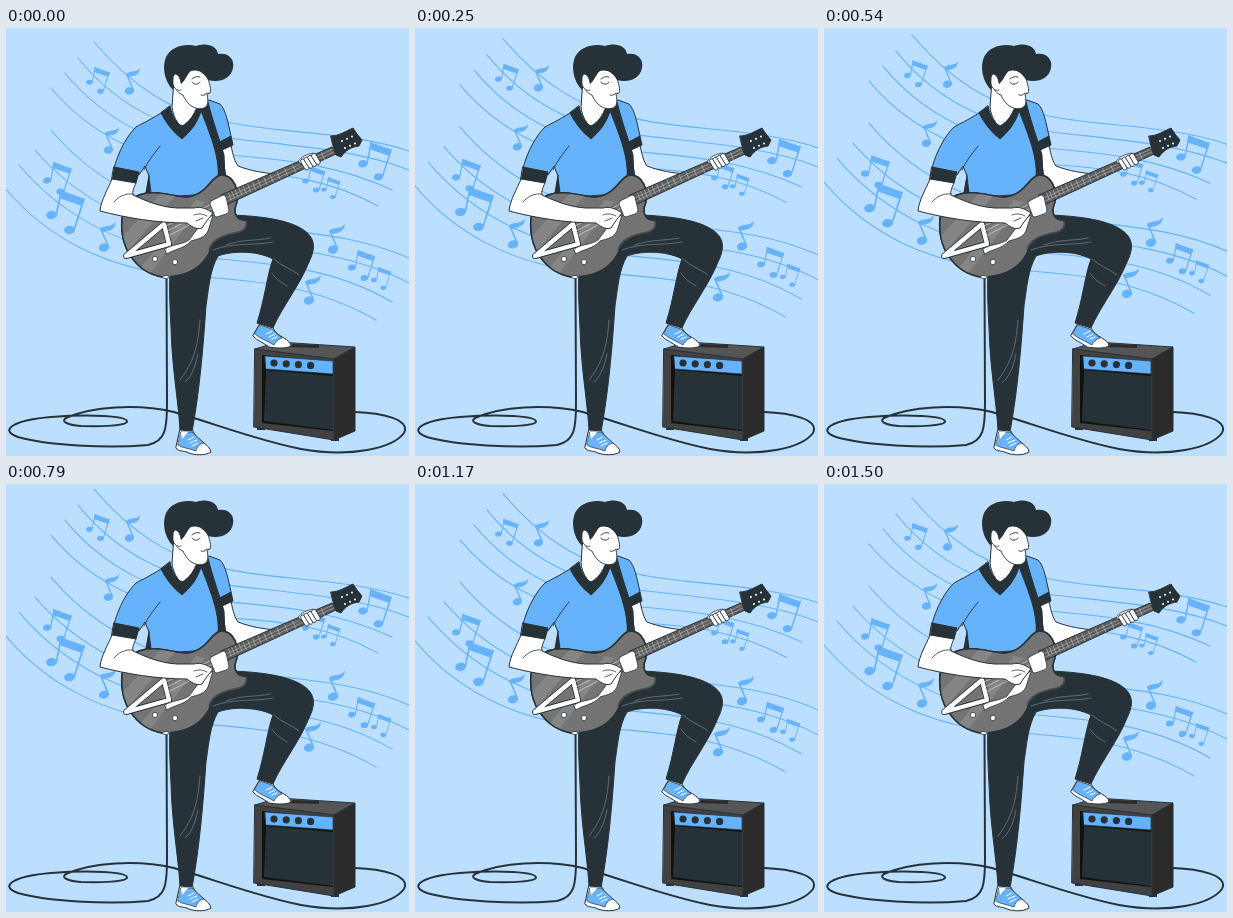
Animation, 403 px wide and 428 px high, one loop 1540 ms. Source, as an HTML page with a canvas:

```html
<!DOCTYPE html>
<html lang="en">
<head>
<meta charset="utf-8">
<title>Guitarist</title>
<style>
html, body { margin: 0; width: 100%; height: 100%; overflow: hidden; background: #bcdfff; }
canvas { display: block; width: 403px; height: 428px; }
</style>
</head>
<body>
<canvas></canvas>
<script>
const LOOP = 1540, FRAME_MS = 1000 / 24, HALF = 18, LIFT = 9.4;
const SKY = '#bcdfff', BLUE = '#66b3fc', INK = '#263238', WHITE = '#fff';
const W = 403, H = 428;
const dpr = window.devicePixelRatio || 1;
const canvas = document.querySelector('canvas');
canvas.width = W * dpr;
canvas.height = H * dpr;
const ctx = canvas.getContext('2d');

function fill(d, color) {
  ctx.fillStyle = color;
  ctx.fill(new Path2D(d));
}
function line(d, color = INK, width = 1) {
  ctx.strokeStyle = color;
  ctx.lineWidth = width;
  ctx.stroke(new Path2D(d));
}
function shape(d, color, edge = INK, width = 1) {
  fill(d, color);
  line(d, edge, width);
}
function oval(x, y, rx, ry, angle, color, edge) {
  ctx.beginPath();
  ctx.ellipse(x, y, rx, ry, angle, 0, Math.PI * 2);
  ctx.fillStyle = color;
  ctx.fill();
  if (edge) { ctx.strokeStyle = edge; ctx.lineWidth = 0.8; ctx.stroke(); }
}
function at(x, y, scale, draw) {
  ctx.save();
  ctx.translate(x, y);
  ctx.scale(scale, scale);
  draw();
  ctx.restore();
}

const staves = [
  'M88,14C124,56 165,86 222,94C265,105 345,103 403,123',
  'M72,30C110,77 162,104 222,110C285,118 350,121 403,142',
  'M59,45C98,93 155,121 222,127C285,132 335,138 386,162',
  'M45,60C85,108 145,137 222,143C280,146 325,152 372,178',
  'M45,102C85,150 145,183 215,194C285,205 345,204 403,230',
  'M29,122C70,170 130,202 205,212C275,220 345,224 403,255',
  'M13,137C55,187 115,220 190,229C260,235 325,238 386,274',
  'M0,161C40,209 98,239 168,247C238,252 305,254 370,292'
];
const pairs = [
  [80, 39, .61], [37, 134, .74], [40, 162, 1], [352, 114, .87],
  [342, 222, .7], [365, 239, .52], [315, 149, .5], [296, 138, .6]
];
const singles = [
  [118, 40, .9], [97, 99, .9], [92, 194, 1], [321, 196, 1], [297, 247, 1]
];

function drawPair() {
  oval(5.5, 25, 5.4, 4.2, -.1, BLUE);
  oval(23.5, 40, 5.4, 4.2, -.1, BLUE);
  fill('M14,0L39,9L36,16L13,8Z', BLUE);
  line('M10.3,25L15,1M28,40L38,9', BLUE, 1.7);
}
function drawSingle() {
  oval(6, 25.5, 5.2, 4.1, -.25, BLUE);
  line('M10.5,25L3,7', BLUE, 1.6);
  fill('M2,7C7,2 13,6 18,0C17,9 10,9 4,10Z', BLUE);
}

function drawMusic(lift) {
  ctx.save();
  ctx.translate(0, -lift);
  staves.forEach(d => line(d, BLUE, 1.1));
  pairs.forEach(p => at(...p, drawPair));
  singles.forEach(p => at(...p, drawSingle));
  ctx.restore();
}

function drawCable() {
  line('M160.5,248L161,375C161,400 160,413 142,417C100,421 40,417 12,409' +
    'C-8,402 8,392 45,389C85,386 121,388 121,393.5C121,398 95,398.5 75,398' +
    'C60,397 54,393 61,389.5C85,379 130,375 168,384C210,396 250,412 295,421' +
    'C345,430 387,420 398,405C405,391 375,385 349,384', INK, 2);
}

function drawAmp() {
  fill('M251,398h8v4h-8zM325,409h8v4h-8z', INK);
  shape('M249,321L272,314L349,319L328,331Z', '#555');
  shape('M328,331L349,319L349,403L328,412Z', '#2b2b2b');
  shape('M249,321L328,331L328,412L248,399Z', '#414141');
  fill('M256,327L327,334L327,403L256,395Z', '#111');
  fill('M260,342L327,348L327,402L258,393Z', INK);
  shape('M259,328L327,333L327,346L260,341Z', BLUE, INK, .7);
  for (let i = 0; i < 4; i++) oval(268 + i * 12.2, 335 + i * .8, 3.6, 3.6, 0, INK);
  fill('M287,316L313,317L313,320L284,319Z', '#2b2b2b');
}

function drawLegs() {
  shape('M225,187C255,188 285,192 299,203C310,211 309,222 303,234' +
    'C294,257 276,279 267,300L251,295C259,270 261,247 267,231' +
    'C250,222 225,223 212,228C204,242 203,258 200,278' +
    'C197,320 194,360 186,404L174,402C172,370 166,340 165,300' +
    'C164,280 163,262 164,243L195,205Z', INK);
  line('M207,222C228,214 246,218 267,214M220,217C236,211 250,213 264,210' +
    'M268,231C275,238 284,240 293,247M266,245C271,253 277,255 281,258' +
    'M194,292C192,320 187,335 174,352M192,326C189,341 184,350 179,354', '#66737a', .9);
}

function drawShoes() {
  shape('M254,296L267,300C271,309 285,311 285,318C280,321 269,320 263,319C257,314 251,313 247,308Z', WHITE);
  shape('M254,297L266,301L276,310C272,311 269,314 268,317C261,313 253,310 249,306Z', BLUE, INK, .7);
  line('M260,306l6,-3M263,309l6,-3M266,311l5,-2', WHITE, 1);
  shape('M174,402L187,403C190,412 205,417 205,424C199,428 188,427 183,425C177,422 172,424 170,420Z', WHITE);
  shape('M175,404L186,404L198,415C193,416 191,419 190,423C182,420 176,420 172,417Z', BLUE, INK, .7);
  fill('M175,404L182,404L176,411Z', WHITE);
  line('M182,412l6,-3M184,415l7,-3M186,418l6,-3', WHITE, 1);
}

function drawTorso() {
  shape('M216,121L225,117C227,128 229,134 232,138C245,143 258,145 270,146L297,135L296,139L236,165L222,160Z', WHITE);
  shape('M158,83C148,90 137,95 130,99C121,108 113,122 108,140L133,147L139,138L143,148L140,170' +
    'L220,165L216,120L225,108C222,95 220,82 214,76L203,72L190,80L174,106Z', BLUE);
  line('M154,118C147,127 142,133 138,142', INK, .9);
  fill('M143,145L139,167L146,169Z', INK);
  shape('M108,139L133,144L130,155L106,151Z', INK);
  shape('M210,116L225,108L227,117L214,123Z', INK);
  shape('M194,80L202,74C207,94 213,110 218,127L219,153L212,150C214,128 203,104 194,80Z', INK);
}

function drawHead() {
  shape('M168,52L166,79C167,89 172,96 176,99C184,95 188,88 191,81L193,66Z', WHITE);
  shape('M164,78C166,88 170,95 176,98C184,94 188,86 191,79L195,83C191,96 184,104 176,111C167,104 160,95 155,85Z', INK);
  shape('M175,44C183,36 194,40 202,49C203,56 206,62 204,65L201,66C202,72 203,78 198,80C190,83 181,77 177,67C171,65 168,59 168,52Z', WHITE, INK, .9);
  fill('M167,62C158,53 156,38 160,29C165,18 180,15 190,18C201,14 211,18 212,26' +
    'C222,24 229,31 227,40C225,51 213,55 202,52C198,44 191,41 185,43' +
    'C181,46 180,52 174,57C174,48 167,43 167,52Z', INK);
  shape('M175,55C174,46 167,42 167,52C166,59 171,64 175,62', WHITE, INK, .8);
  line('M186,51C188,49 191,48 194,49M186,54C188,57 192,57 194,54M195,67C197,68 199,67 201,65', INK, .9);
}

const body = 'M116,190C113,220 130,244 156,249C183,250 199,237 205,221C209,211 221,208 232,206' +
  'C240,204 244,198 241,192C231,193 226,186 231,174C233,162 228,146 214,147' +
  'C204,150 201,167 180,169C164,168 149,161 133,167C121,173 117,181 116,190Z';

function drawGuitar() {
  shape(body, '#747474', INK, 1.4);
  ctx.save();
  ctx.clip(new Path2D(body));
  fill('M110,216L160,160L176,160L116,230ZM128,248L190,172L199,174L139,252Z', '#858585');
  line('M205,221C209,211 221,208 232,206C240,204 244,198 241,192', '#4a4a4a', 5);
  ctx.restore();
  line(body, INK, 1.4);

  line('M120,228L158,196L163,216Z', INK, 6);
  line('M120,228L158,196L163,216Z', WHITE, 4.3);
  shape('M159,221C166,216 176,217 183,212L198,192L207,187L202,203C198,211 190,211 185,213C178,221 168,221 161,226Z', WHITE, INK, .8);
  line('M158,199L218,170M159,204L219,174M160,209L220,178', '#e5e5e5', .6);
  oval(149, 231, 2.7, 2.7, 0, WHITE, INK);
  oval(169, 234, 2.7, 2.7, 0, WHITE, INK);
  oval(160, 249, 3.5, 1.5, 0, WHITE, INK);

  shape('M215,167L326,119L330,126L220,177Z', '#5c5c5c', INK, 1);
  for (let i = 1; i < 17; i++) {
    const k = 1 - Math.pow(.92, i);
    const x = 327 - k * 142, y = 120 + k * 61;
    if (x > 222) line(`M${x},${y}l3,7`, '#c9c9c9', .6);
  }
  line('M218,171L327,121M219,174L328,124', '#b5b5b5', .6);
  shape('M325,108C333,108 340,103 347,100L351,106L356,112L353,118C345,119 340,122 335,129L330,127L327,118Z', INK);
  for (let i = 0; i < 3; i++) {
    oval(336 + i * 5, 113 - i * 2.2, 1, 1, 0, WHITE);
    oval(339 + i * 5, 120 - i * 2.2, 1, 1, 0, WHITE);
  }
  shape('M205,173L217,167Q219,167 220,169L223,182Q223,185 220,186L211,189Q208,189 208,186L204,176Q204,174 205,173Z', WHITE, INK, .8);
}

function drawHands() {
  shape('M106,151L130,155C128,159 126,164 127,167C140,173 154,179 171,180L188,180' +
    'C195,178 201,181 207,185C203,190 199,195 196,200C190,202 185,198 181,195' +
    'C151,195 121,190 94,183C95,172 102,161 106,151Z', WHITE);
  line('M127,166C119,165 112,169 108,174M188,187C193,185 197,186 201,188M190,193L197,190', INK, .8);
  shape('M292,134C295,128 302,126 308,125L311,130L299,137Z', WHITE, INK, .8);
  for (let i = 0; i < 4; i++) {
    at(296 + i * 3.7, 132 - i * 1.8, 1, () => {
      ctx.rotate(-.5);
      shape('M-2,0Q0,-2 2.5,0L2.8,10Q0.5,13 -1.6,10Z', WHITE, INK, .8);
    });
  }
}

function draw(time) {
  const frame = Math.min(36, Math.floor((time + 5) / FRAME_MS));
  const lift = LIFT * (1 - Math.abs(frame / HALF - 1));
  ctx.setTransform(dpr, 0, 0, dpr, 0, 0);
  ctx.lineCap = ctx.lineJoin = 'round';
  ctx.fillStyle = SKY;
  ctx.fillRect(0, 0, W, H);
  drawMusic(lift);
  drawCable();
  drawAmp();
  drawLegs();
  drawShoes();
  drawTorso();
  drawHead();
  drawGuitar();
  drawHands();
}

function tick() {
  draw(performance.now() % LOOP);
  requestAnimationFrame(tick);
}
tick();
</script>
</body>
</html>
```
